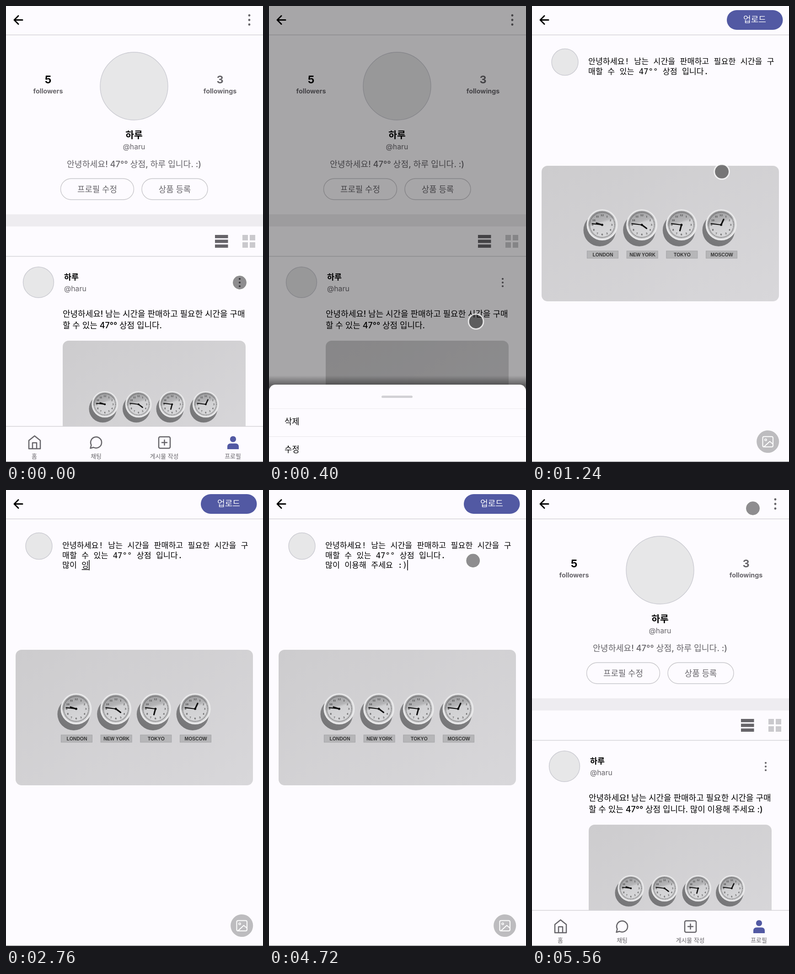
Write an HTML page that moves like this. It is 562x996 px and loops after 5600 ms.

```html
<!DOCTYPE html>
<html lang="ko">
<head>
<meta charset="utf-8">
<title>게시글 수정</title>
<style>
html, body { margin: 0; width: 100%; height: 100%; overflow: hidden; background: #fdfbff; }
svg { display: block; width: 562px; height: 996px; }
text { font-family: Inter, "Noto Sans CJK KR", "Noto Sans CJK JP", sans-serif; white-space: pre; }
.mono { font: 500 17.3px "DejaVu Sans Mono", "Noto Sans CJK KR", "Noto Sans CJK JP", monospace; }
.plate { font: bold 10.4px "Liberation Sans", Arial, sans-serif; }
.num { font: bold 7px "Liberation Serif", serif; }
</style>
</head>
<body>
<svg id="stage" viewBox="0 0 562 996"></svg>
<script>
const INK = '#666469', RULE = '#d3d2d6', BLUE = '#5259a3', PAPER = '#fdfbff';
const LOOP = 5600;

const text = (x, y, size, str, { fill = '#000', weight = 500, mid, cls, id } = {}) =>
  `<text x="${x}" y="${y}" font-size="${size}" fill="${fill}" font-weight="${weight}"` +
  `${mid ? ' text-anchor="middle"' : ''}${cls ? ` class="${cls}"` : ''}${id ? ` id="${id}"` : ''}>${str}</text>`;
const rect = (x, y, w, h, fill, r = 0, extra = '') =>
  `<rect x="${x}" y="${y}" width="${w}" height="${h}" rx="${r}" fill="${fill}" ${extra}/>`;
const disc = (x, y, r, fill, extra = '') => `<circle cx="${x}" cy="${y}" r="${r}" fill="${fill}" ${extra}/>`;
const stroke = (d, color, w) =>
  `<path d="${d}" fill="none" stroke="${color}" stroke-width="${w}" stroke-linecap="round" stroke-linejoin="round"/>`;
const rule = y => rect(0, y, 562, 1.4, RULE);
const dots = (x, y, gap, r) => [-gap, 0, gap].map(d => disc(x, y + d, r, INK)).join('');
const avatar = (x, y, r) => disc(x, y, r, '#e7e7e8', 'stroke="#cbcbd2" stroke-width="1.4"');
const polar = (deg, r) => [r * Math.sin(deg * Math.PI / 180), -r * Math.cos(deg * Math.PI / 180)];

function clock(i, city, hour) {
  let numerals = '';
  for (let n = 1; n <= 12; n++) {
    const [x, y] = polar(n * 30, 21);
    numerals += text(x, y + 2.4, 7, n, { fill: '#444', mid: true, cls: 'num' });
  }
  const hand = (deg, len, w) => stroke(`M0 0L${polar(deg, len)}`, '#111', w);
  return `<g transform="translate(${(i - 1.5) * 86.7} 0)">
    ${disc(-5.5, 11.5, 35.5, 'url(#shade)')}
    ${disc(0, 0, 34, '#e9e9ea')}
    ${disc(0, 0, 30.8, 'url(#face)')}
    <circle r="27.5" fill="none" stroke="#4a4a4a" stroke-width="2.8" stroke-dasharray="1 1.88"/>
    ${numerals}${hand(277, 22, 2.2)}${hand(hour, 13, 3.2)}${disc(0, 0, 2.5, '#111')}
    ${rect(-33, 57, 68, 16, '#b6b6b8', 0, 'stroke="#a3a3a6" stroke-width="1"')}
    ${text(1.5, 68.6, 10.4, city, { fill: '#333', mid: true, cls: 'plate' })}
  </g>`;
}
const clocks = [['LONDON', 287], ['NEW YORK', 127], ['TOKYO', 195], ['MOSCOW', 25]]
  .map(([city, hour], i) => clock(i, city, hour)).join('');
const photo = (x, y, w, h, cx, cy, scale) => rect(x, y, w, h, 'url(#wall)', 13) +
  `<g transform="translate(${cx} ${cy}) scale(${scale})">${clocks}</g>`;

const back = stroke('M19 30.5H36M27 21.5L18 30.5L27 39.5', '#000', 3);
const pill = (x, w, label) =>
  rect(x, 377, w, 46, 'none', 23, 'stroke="#c8c7cb" stroke-width="1.4"') +
  text(x + w / 2, 406.5, 17.9, label, { fill: INK, mid: true });
const tab = (x, label) => text(x, 987.5, 12.9, label, { fill: INK, mid: true });
const grid = [517, 533].map(x => [500, 516].map(y => rect(x, y, 12, 12, '#cac9cd')).join('')).join('');

const profile = `<g id="profile">
  ${back}${dots(532, 30.5, 10, 2.4)}${rule(62.5)}
  ${text(92, 169, 23.5, '5', { weight: 700, mid: true })}
  ${text(92, 191, 14.3, 'followers', { weight: 700, mid: true, fill: INK })}
  ${text(468, 169, 23.5, '3', { weight: 700, mid: true, fill: INK })}
  ${text(468, 191, 14.3, 'followings', { weight: 700, mid: true, fill: INK })}
  ${avatar(280, 175, 74)}
  ${text(280, 289, 20.4, '하루', { weight: 700, mid: true })}
  ${text(280, 313, 15.8, '@haru', { weight: 400, mid: true, fill: INK })}
  ${text(280, 352, 18.3, '안녕하세요! 47°° 상점, 하루 입니다. :)', { mid: true, fill: INK })}
  ${pill(119.5, 160, '프로필 수정')}${pill(297, 144, '상품 등록')}
  ${rect(0, 455, 562, 26.5, '#eeecf0')}
  ${[500, 510.4, 520.8].map(y => rect(457, y, 28.5, 7.2, INK)).join('')}${grid}
  ${rule(546)}
  ${avatar(71, 603.5, 33.5)}
  ${text(127, 598, 17.4, '하루', { weight: 700 })}
  ${text(127, 623, 15.8, '@haru', { weight: 400, fill: INK })}
  ${dots(511, 604, 8, 2.1)}
  ${text(124, 679, 18, '안녕하세요! 남는 시간을 판매하고 필요한 시간을 구매')}
  ${text(124, 704, 18, '', { id: 'post' })}
  ${photo(124, 731, 400, 240, 326.5, 870, 0.848)}
  ${rect(0, 918, 562, 78, PAPER)}${rule(917.5)}
  ${stroke('M50 949L62.5 939L75 949V967H50ZM58 967V954H67V967', INK, 2.5)}${tab(62, '홈')}
  ${stroke('M184.5 966L186.5 959A12 12 0 1 1 191.5 964Z', INK, 2.5)}${tab(197, '채팅')}
  ${rect(334, 941, 25, 25, 'none', 3, `stroke="${INK}" stroke-width="2.5"`)}
  ${stroke('M346.5 948V959M341 953.5H352', INK, 2.5)}${tab(346, '게시물 작성')}
  ${disc(496.5, 946, 6.6, BLUE)}<path d="M484 968V963Q484 955.5 491 955.5H502Q509 955.5 509 963V968Z" fill="${BLUE}"/>
  ${tab(496, '프로필')}
</g>`;

const sheet = `<g id="modal">
  ${rect(0, 0, 562, 996, 'rgba(0,0,0,.34)')}
  <g id="sheet">
    ${rect(0, -20, 562, 40, 'url(#lift)')}
    ${rect(0, 0, 562, 220, PAPER, 14)}
    ${rect(246, 24, 68, 5, '#d2d1d5', 2.5)}
    ${rect(0, 52, 562, 1, '#ecebef')}${rect(0, 113, 562, 1, '#e6e5e9')}
    ${text(34, 87, 17.7, '삭제')}${text(34, 148, 17.7, '수정')}
  </g>
</g>`;

const mono = (y, str, id, fill) => text(123, y, 17.3, str, { cls: 'mono', id, fill });
const editor = `<g id="editor">
  ${back}${rule(62.5)}
  ${rect(426, 9, 122.5, 43, BLUE, 21.5)}
  ${text(487, 36, 18.1, '업로드', { fill: '#fff', mid: true })}
  <g id="blank">
    ${disc(72, 122, 29.3, 'none', 'stroke="#d3d2d6" stroke-width="1.2"')}
    <path d="M43.5 94.5H59L65.5 101V115.5H43.5Z" fill="#c6d4f4" stroke="#a0a0a4"/>
    <path d="M44 115L53 106L61 115Z" fill="#6a9e67"/>
    <path d="M54 116L66 105V116Z" fill="${PAPER}"/>
    ${text(64.5, 111, 20.2, '프')}${text(43, 133, 20.2, '로필')}${text(43, 155, 20.2, '이미지')}
    ${mono(127, '게시글 입력하기...', '', '#757477')}
  </g>
  <g id="filled">
    ${avatar(72, 122.5, 29)}
    ${mono(127, '안녕하세요! 남는 시간을 판매하고 필요한 시간을 구')}
    ${mono(148.5, '매할 수 있는 47°° 상점 입니다.', 'line2')}
    ${mono(170, '', 'line3')}
    ${rect(0, 173, 15, 1.5, '#000', 0, 'id="mark"')}
    ${rect(0, 153, 1.5, 22.5, '#000', 0, 'id="caret"')}
    ${photo(21, 349, 519, 296, 283.5, 478, 1)}
  </g>
  ${disc(515.7, 951.5, 24.5, '#bdbcbf')}
  ${rect(504.5, 940.5, 22.5, 22.5, 'none', 3, 'stroke="#fff" stroke-width="2"')}
  ${disc(511, 947.5, 2, 'none', 'stroke="#fff" stroke-width="1.7"')}
  ${stroke('M507 963L520 951L527 957', '#fff', 2)}
  <g id="status">
    ${rect(-8, 967, 192, 40, '#1f2023', 5, 'filter="url(#blur)" opacity=".3"')}
    ${rect(-8, 967, 192, 40, '#1f2023', 5)}
    ${text(7, 991, 18.4, 'mandarin.api.we...', { fill: '#c9c9cc', weight: 400 })}
  </g>
</g>`;

const gradient = (id, attrs, ...stops) => `<linearGradient id="${id}" ${attrs}>` +
  stops.map(([at, color, alpha = 1]) => `<stop offset="${at}" stop-color="${color}" stop-opacity="${alpha}"/>`).join('') +
  '</linearGradient>';
const $ = id => document.getElementById(id);
$('stage').innerHTML = `<defs>
  ${gradient('wall', 'x2="1" y2="1"', [0, '#cdccce'], [1, '#d8d7da'])}
  ${gradient('shade', 'x1="0" y1="1" x2=".6" y2="0"', [0, '#727274'], [1, '#88888a'])}
  ${gradient('face', 'x1=".3" y1="0" x2=".6" y2="1"', [0, '#9c9c9e'], [0.38, '#b4b4b6'], [0.46, '#d0d0d2'], [1, '#d8d8da'])}
  ${gradient('lift', 'x2="0" y2="1"', [0, '#000', 0], [0.5, '#000', 0.4], [1, '#000', 0.45])}
  <filter id="blur" x="-20%" y="-60%" width="140%" height="220%"><feGaussianBlur stdDeviation="7"/></filter>
</defs>
${rect(0, 0, 562, 996, PAPER)}${profile}${editor}${sheet}
${rect(0, 995, 562, 1, '#77767a')}
<g id="pointer">${disc(0, 0, 15, 'rgba(0,0,0,.44)')}
  ${disc(0, 0, 16.4, 'none', 'stroke="#fff" stroke-opacity=".7" stroke-width="2.8"')}</g>`;

// Each syllable as the input method builds it, one key at a time.
const typed = ['', 'ㅁ', '마', '만', '많', '많ㅇ', '많이', '많이 ', '많이 ㅇ', '많이 이', '많이 잉',
  '많이 이요', '많이 이용', '많이 이용ㅎ', '많이 이용해', '많이 이용해 ', '많이 이용해 ㅈ', '많이 이용해 주',
  '많이 이용해 줏', '많이 이용해 주세', '많이 이용해 주셍', '많이 이용해 주세요', '많이 이용해 주세요 ',
  '많이 이용해 주세요 :', '많이 이용해 주세요 :)'];
const keyTime = n => n < 15 ? 2200 + 52 * n : n < 22 ? 3090 + 60 * (n - 15) : 3690 + 150 * (n - 22);

const track = [[80, 511, 604], [400, 453, 688], [620, 362, 952], [800, 357, 955], [940, 366, 900],
  [1240, 415, 362], [1840, 448, 252], [2100, 410, 146], [4400, 404, 204], [4720, 446, 155],
  [4840, 468, 63], [4960, 483, 40], [5600, 483, 40]];

function pointerAt(t) {
  if (t <= track[0][0]) return track[0].slice(1);
  const i = track.findIndex(p => p[0] >= t);
  const [t0, x0, y0] = track[i - 1], [t1, x1, y1] = track[i];
  const p = (t - t0) / (t1 - t0);
  return [x0 + (x1 - x0) * p, y0 + (y1 - y0) * p];
}

const show = (id, on) => $(id).style.display = on ? '' : 'none';
const place = (id, x, y) => $(id).setAttribute('transform', `translate(${x} ${y})`);

function draw(t) {
  const editing = t >= 660 && t < 5120;
  show('profile', !editing);
  show('editor', editing);
  show('blank', t < 920);
  show('filled', t >= 920);
  show('status', t < 1080);

  $('post').textContent = '할 수 있는 47°° 상점 입니다.' + (t >= 5120 ? ' 많이 이용해 주세요 :)' : '');

  show('modal', t >= 120 && t < 660);
  const p = Math.min(1, Math.max(0, (t - 134) / 500));
  place('sheet', 0, 996 - 188 * (1 - (1 - p) ** 3));

  show('caret', t >= 2110);
  show('mark', false);
  if (editing) {
    let n = -1;
    while (n + 1 < typed.length && keyTime(n + 1) <= t) n++;
    const str = typed[n] || '', line = $('line3');
    line.textContent = str;
    const end = str ? line.getComputedTextLength() : 0;
    if (n < 0) place('caret', 123 + $('line2').getComputedTextLength(), -21.5);
    else place('caret', 123 + end, 0);
    if (/[ㄱ-힣]$/.test(str)) {
      show('mark', true);
      place('mark', 123 + end - 15.5, 0);
    }
  }

  show('pointer', t < 2200 || t >= 4400);
  place('pointer', ...pointerAt(t));
}

const start = performance.now();
function tick() {
  draw((performance.now() - start) % LOOP);
  requestAnimationFrame(tick);
}
tick();
</script>
</body>
</html>
```
